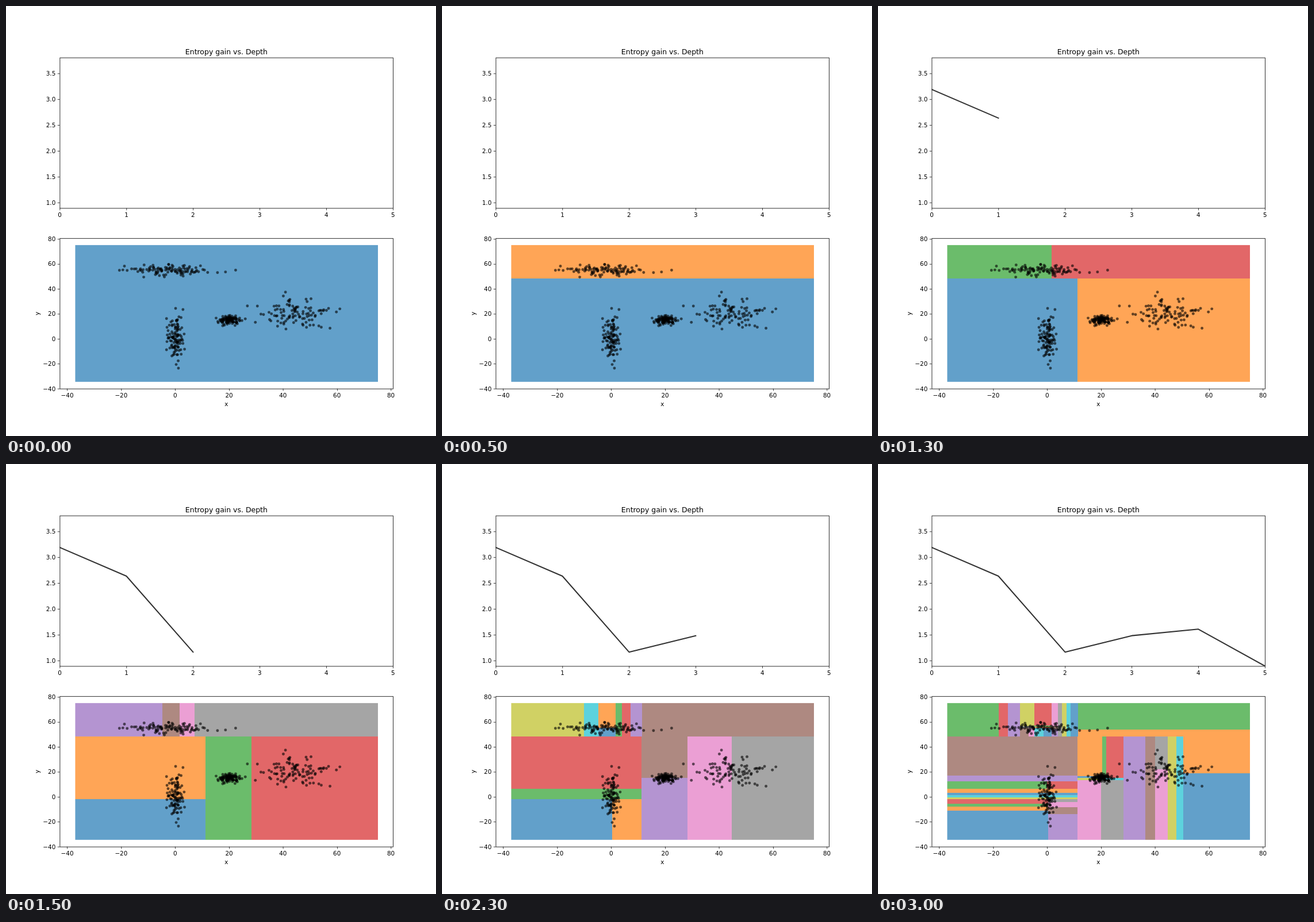
Write an HTML page with a canvas that moves like this. It is 748x748 px and loops after 3.5 s.

```html
<!DOCTYPE html>
<html lang="en">
<head>
<meta charset="utf-8">
<title>Entropy gain vs. Depth</title>
<style>
html, body { margin: 0; width: 100%; height: 100%; overflow: hidden; background: #fff; }
canvas { display: block; }
</style>
</head>
<body>
<canvas id="stage" width="748" height="748"></canvas>
<script>
// Everything is laid out on a 1000-unit figure and scaled to the stage.
const SCALE = 0.748, STEP_MS = 500, STEPS = 7;
const ctx = document.getElementById('stage').getContext('2d');
ctx.scale(SCALE, SCALE);

const palette = ['#62a0ca', '#ffa556', '#6bbc6b', '#e26768', '#b494d1',
                 '#ae8981', '#eb9fd4', '#a5a5a5', '#d0d164', '#5dd2dd'];
const entropy = [3.189, 2.635, 1.165, 1.482, 1.608, 0.894];

const px = v => 393.3 + 6.272 * v;
const py = v => 773.9 - 2.903 * v;
const depthX = v => 125 + 155 * v;
const gainY = v => 577.4 - 120.2 * v;

let seed = 11;
const random = () => (seed = (seed * 48271) % 2147483647) / 2147483647;

// Normal cloud: evenly spread radii and jittered golden-angle directions.
function cluster(cx, cy, sx, sy, count = 105) {
  return Array.from({ length: count }, (_, i) => {
    const r = Math.sqrt(-2 * Math.log((i + 1) / (count + 1)));
    const angle = i * 2.4 + random() * 2;
    return { x: px(cx + sx * r * Math.cos(angle)), y: py(cy + sy * r * Math.sin(angle)) };
  });
}
const points = [
  ...cluster(-2, 55, 8, 2.2),
  ...cluster(0.2, 0.5, 1.5, 9.3),
  ...cluster(20, 15, 2, 1.8),
  ...cluster(45, 20, 7, 5.8)
];

// Axis cut at each depth ("-" keeps the cell whole). The first cuts separate
// the clusters; every later one passes through the mean of the cell's points.
const axes = ['y', 'xx', 'yxxx', 'xyyxxyxx', 'yyyyyxxxxyxyyxxy',
              'yyyyyyxyxxyxxyxyx-xy--y--y------'];
const firstCuts = [[634], [464, 404], [780, 571, 363, 439]];

function cutPosition(axis, depth, index, cell) {
  if (firstCuts[depth]) return firstCuts[depth][index];
  const inside = points.filter(p => p.x >= cell.x[0] && p.x < cell.x[1] &&
                                    p.y >= cell.y[0] && p.y < cell.y[1]);
  const values = inside.length ? inside.map(p => p[axis]) : cell[axis];
  return values.reduce((a, b) => a + b) / values.length;
}

// Leaves of the partition in order, low side first (y grows downwards).
function partition(maxDepth, depth = 0, index = 0, cell = { x: [161, 865], y: [556, 874] }) {
  const axis = depth < maxDepth ? axes[depth][index] : '-';
  if (axis === '-') return [cell];
  const cut = Math.round(cutPosition(axis, depth, index, cell) * SCALE) / SCALE;
  const halves = [{ ...cell, [axis]: [cell[axis][0], cut] },
                  { ...cell, [axis]: [cut, cell[axis][1]] }];
  if (axis === 'y') halves.reverse();
  return halves.flatMap((half, i) => partition(maxDepth, depth + 1, index * 2 + i, half));
}
const partitions = Array.from({ length: STEPS }, (_, depth) => partition(depth));

function drawRegions(step) {
  partitions[step].forEach(({ x, y }, i) => {
    ctx.fillStyle = palette[i % palette.length];
    ctx.fillRect(x[0], y[0], x[1] - x[0], y[1] - y[0]);
  });
}

function drawPoints() {
  ctx.fillStyle = 'rgba(0, 0, 0, 0.6)';
  for (const { x, y } of points) {
    ctx.beginPath();
    ctx.arc(x, y, 3.3, 0, 2 * Math.PI);
    ctx.fill();
  }
}

// The curve shows one vertex per depth, beginning with its first segment.
function drawCurve(step) {
  if (step < 2) return;
  ctx.save();
  ctx.beginPath();
  ctx.rect(125, 120, 775, 350);
  ctx.clip();
  ctx.beginPath();
  entropy.slice(0, step).forEach((v, i) => ctx.lineTo(depthX(i), gainY(v)));
  ctx.strokeStyle = '#333';
  ctx.lineWidth = 2.78;
  ctx.lineJoin = 'round';
  ctx.lineCap = 'square';
  ctx.stroke();
  ctx.restore();
}

function text(str, x, y, align = 'center', size = 13.89) {
  ctx.font = size + 'px "DejaVu Sans", sans-serif';
  ctx.textAlign = align;
  ctx.fillText(str, x, y);
}
const label = v => String(v).replace('-', '\u2212');

function xTick(x, bottom, str) {
  ctx.fillRect(Math.round(x), bottom, 1, 5);
  text(str, x, bottom + 20.5);
}
function yTick(y, str) {
  ctx.fillRect(120, Math.round(y), 5, 1);
  text(str, 115.3, y + 5.2, 'right');
}

function drawAxes() {
  ctx.fillStyle = ctx.strokeStyle = '#000';
  ctx.lineWidth = 1.1;
  ctx.strokeRect(125.5, 120.5, 775, 350);
  ctx.strokeRect(125.5, 540.5, 775, 350);
  text('Entropy gain vs. Depth', 512.5, 111.7, 'center', 16.67);

  for (let i = 0; i <= 5; i++) {
    xTick(depthX(i), 470, label(i));
    yTick(gainY(1 + i / 2), (1 + i / 2).toFixed(1));
  }
  for (let v = -40; v <= 80; v += 20) {
    xTick(px(v), 890, label(v));
    yTick(py(v), label(v));
  }
  text('x', 512.5, 930);
  ctx.save();
  ctx.translate(77, 715);
  ctx.rotate(-Math.PI / 2);
  text('y', 0, 0);
  ctx.restore();
}

function frame() {
  const step = Math.floor(performance.now() / STEP_MS) % STEPS;
  ctx.fillStyle = '#fff';
  ctx.fillRect(0, 0, 1000, 1000);
  drawRegions(step);
  drawPoints();
  drawCurve(step);
  drawAxes();
  requestAnimationFrame(frame);
}
frame();
</script>
</body>
</html>
```
